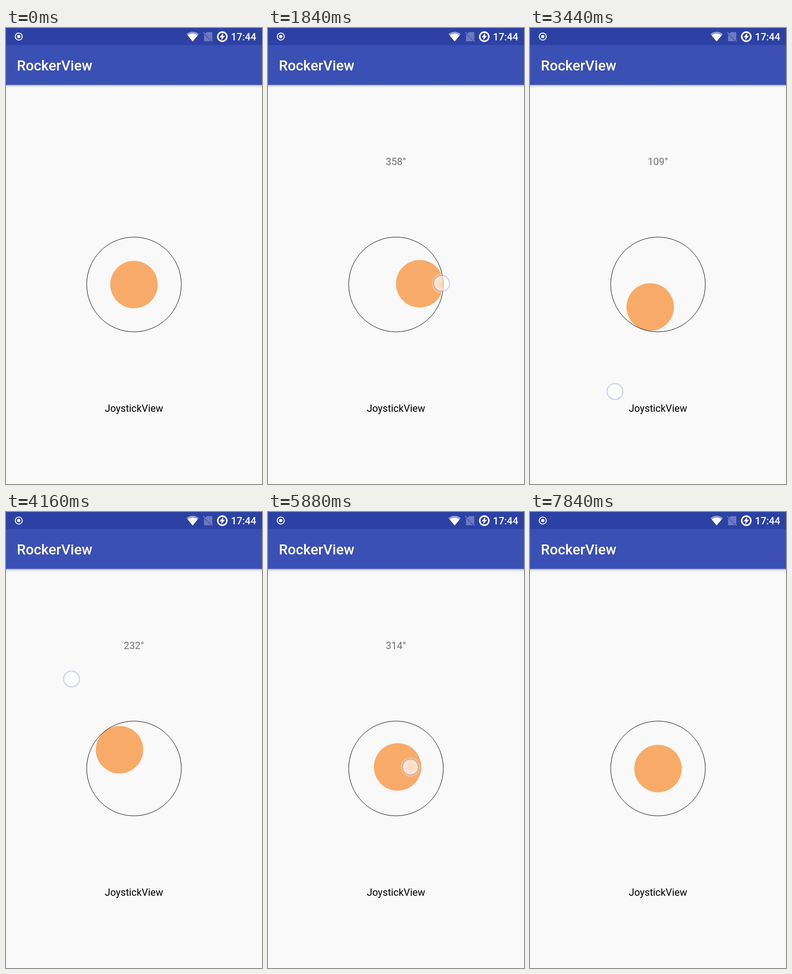
Write an HTML page that moves like this. It is 561 px wide and 998 px high and loops after 7880 ms.

```html
<!DOCTYPE html>
<html lang="en">
<head>
<meta charset="utf-8">
<title>Joystick demo</title>
<style>
  html, body { margin: 0; width: 100%; height: 100%; overflow: hidden; background: #f9f9fa; }
  svg { display: block; width: 561px; height: 998px; }
  text { font-family: Roboto, "Noto Sans", sans-serif; font-size: 21.8px; }
  .bold { font-weight: 500; fill: #fff; }
  .title { font-size: 31.2px; }
  .mid { text-anchor: middle; }
</style>
</head>
<body>
<svg viewBox="0 0 561 998">
  <defs>
    <linearGradient id="shade" x2="0" y2="1">
      <stop offset="0" stop-color="#000" stop-opacity=".28"/>
      <stop offset=".4" stop-color="#000" stop-opacity=".09"/>
      <stop offset="1" stop-color="#000" stop-opacity="0"/>
    </linearGradient>
    <radialGradient id="spot">
      <stop offset="0" stop-color="#fff" stop-opacity=".55"/>
      <stop offset="1" stop-color="#fff" stop-opacity=".72"/>
    </radialGradient>
  </defs>

  <rect width="561" height="998" fill="#f9f9fa"/>
  <rect y="124.6" width="561" height="7" fill="url(#shade)"/>
  <rect width="561" height="124.6" fill="#3b50b5"/>
  <rect width="561" height="37.4" fill="#2d41a5"/>

  <!-- status bar -->
  <circle cx="28" cy="18.7" r="7.7" fill="none" stroke="#fff" stroke-width="2"/>
  <circle cx="28" cy="18.7" r="3.6" fill="#fff"/>
  <path d="M395.5 13.2Q409 3.5 422.5 13.2L409 29.5Z" fill="#fff" opacity=".5"/>
  <path d="M398 16Q409 8.6 420 16L409 29.5Z" fill="#fff"/>
  <g opacity=".3">
    <path d="M440 9H452V29H434V15Z" fill="#fff"/>
    <path d="M433 10.5L453 30.5" stroke="#2d41a5" stroke-width="3"/>
    <path d="M432 9L453 29.5" stroke="#fff" stroke-width="2"/>
  </g>
  <circle cx="474" cy="19" r="10" fill="none" stroke="#fff" stroke-width="3.3"/>
  <path d="M476 11L468 20.5H472.6L471.6 27L480 17H475.4Z" fill="#fff"/>
  <text class="bold" x="493" y="27">17:44</text>

  <text class="bold title" x="23.8" y="93">RockerView</text>
  <text id="angle" class="mid" x="280.5" y="300" fill="#737373"></text>
  <text class="mid" x="280.5" y="840" fill="#000">JoystickView</text>

  <circle id="knob" cx="280.5" cy="561.5" r="52" fill="#f8ab69"/>
  <circle cx="280.5" cy="561.3" r="103.7" fill="none" stroke="#000"/>
  <g id="touch" visibility="hidden">
    <circle r="19.5" fill="none" stroke="#fff" stroke-opacity=".3" stroke-width="3"/>
    <circle r="18.4" fill="none" stroke="#8c9be0" stroke-opacity=".18" stroke-width="2"/>
    <circle r="17" fill="url(#spot)" stroke="#7f8fd8" stroke-opacity=".36" stroke-width="2"/>
  </g>
</svg>
<script>
const LOOP = 7880, STEP = 40, LAG = 16;
const CX = 280.5, CY = 561.5, REACH = 52;
const REST = -0.4;              // angle held before and after a turn
const LAND = [3.5, -3.6];       // where the finger first lands
const PULL = 206;               // ms to pull out to the side

// A finger lands, pulls right, then turns clockwise (rate in degrees per ms)
const drags = [
  { down: 1778, turn: 2783, up: 5180, rate: .171 },
  { down: 5864, turn: 6476, up: 7740, rate: .12 }
];

const byId = id => document.getElementById(id);
const knob = byId("knob"), touch = byId("touch"), label = byId("angle");
const clamp = (v, lo, hi) => Math.min(hi, Math.max(lo, v));

// Finger offset from the centre; the orbit is deeper than it is wide
function finger(drag, t) {
  const angle = clamp(REST + drag.rate * (t - drag.turn), REST, REST + 360);
  const rad = angle * Math.PI / 180;
  const dist = 192 + 70 * Math.sin(rad) ** 2;
  const left = 1 - clamp((t - drag.down) / PULL, 0, 1);
  const mix = (from, to) => to + (from - to) * left * left;
  return [mix(LAND[0], dist * Math.cos(rad)), mix(LAND[1], dist * Math.sin(rad))];
}

function draw(time) {
  const t = Math.floor(time % LOOP / STEP) * STEP;
  const drag = drags.find(d => t >= d.down && t < d.up);
  let dx = 0, dy = 0, text = "";
  if (drag) {
    const [tx, ty] = finger(drag, t);
    touch.setAttribute("transform", `translate(${CX + tx} ${CY + ty})`);
    [dx, dy] = finger(drag, t - LAG);
    const angle = Math.atan2(dy, dx) * 180 / Math.PI;
    text = Math.floor((angle + 360) % 360) + "°";
    const scale = Math.min(1, REACH / Math.hypot(dx, dy));
    dx *= scale;
    dy *= scale;
  }
  touch.setAttribute("visibility", drag ? "visible" : "hidden");
  knob.setAttribute("cx", CX + dx);
  knob.setAttribute("cy", CY + dy);
  label.textContent = text;
}

const start = performance.now();
function tick() {
  draw(performance.now() - start);
  requestAnimationFrame(tick);
}
tick();
</script>
</body>
</html>
```
